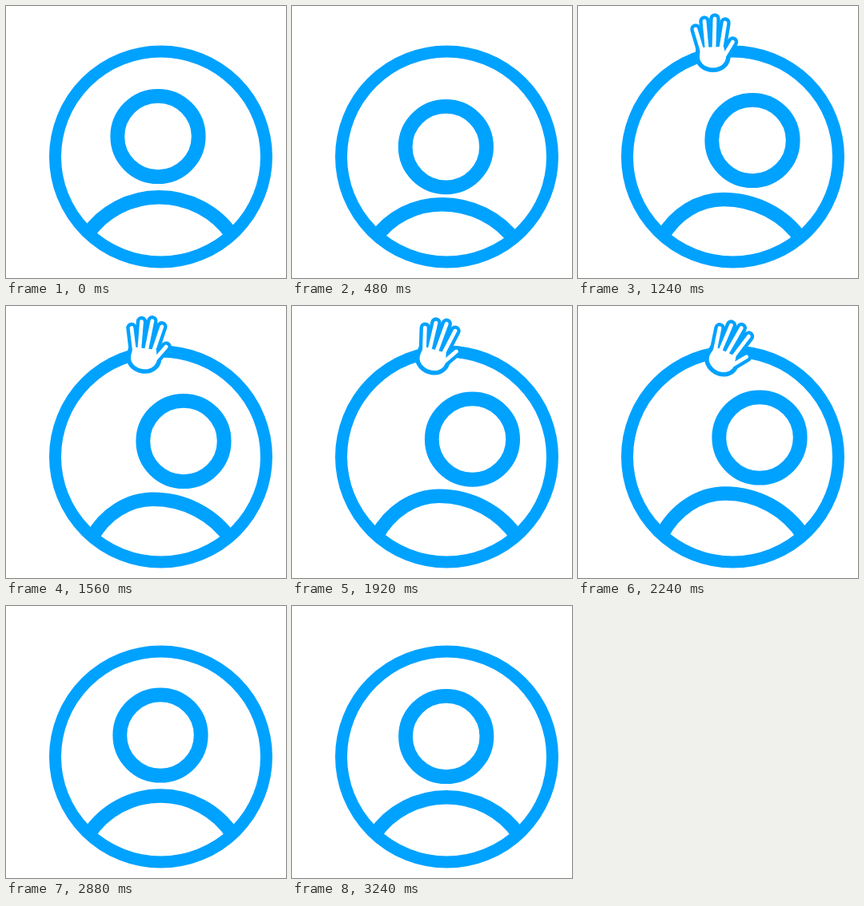
Animation of 350x341 px, one loop 4.08 s. Source, as an HTML page with a canvas:

```html
<!DOCTYPE html>
<html lang="en">
<head>
<meta charset="utf-8">
<title>Waving avatar</title>
<style>
  html, body { margin: 0; width: 100%; height: 100%; overflow: hidden; background: #fff; }
  canvas { display: block; }
</style>
</head>
<body>
<canvas id="stage" width="350" height="341"></canvas>
<script>
const ctx = document.getElementById('stage').getContext('2d');
const BLUE = '#00a2ff', WHITE = '#fff';
const LOOP = 4080, STEP = 40;
const RING = { x: 193.5, y: 189, r: 132, w: 15 };

// time, head x y, shoulder peak x y, left end x y, right end x y
const POSES = [
  [0,    190, 163.5,   191.5, 239.7, 101.5, 287, 283, 288],
  [240,  179, 168,     189, 243,     102, 289,   281, 291],
  [520,  195, 177,     187, 249,     104, 292,   279, 295],
  [800,  212.5, 173,   186, 246.5,   105, 292,   278, 295],
  [1240, 218, 168.5,   182, 242.5,   105, 290,   280, 294],
  [1560, 222, 169.5,   184, 242.3,   107, 291,   281, 293],
  [2240, 227, 165,     184, 235,     104, 288,   283, 290],
  [2600, 193.5, 181.5, 193, 261,     111, 295,   276, 295],
  [2880, 193, 162,     193, 238,     103, 287,   283.5, 287],
  [3240, 192.7, 163.5, 193, 239.7,   103, 287,   283.5, 287]
];

// time, centre x y, degrees, scale
const ENTRY = [
  [600, 68, 138, -55, 0],
  [680, 76, 122, -46, 0.85],
  [800, 114, 71.5, -18, 0.96],
  [920, 160, 64, 0, 1]
];

// finger tip and root, relative to the palm centre
const FINGERS = [
  [-22, -35, -14, -8],
  [-11, -45, -8, -12],
  [2, -48, 1, -12],
  [15, -43, 10, -12],
  [24.5, -19, 13, 0]
];

const clamp = v => Math.max(0, Math.min(1, v));
const mix = (a, b, k) => a + (b - a) * k;
const smooth = (t, a, b) => {
  const k = clamp((t - a) / (b - a));
  return k * k * (3 - 2 * k);
};

// Smooth curve through the keys without overshoot
function sample(keys, t) {
  const last = keys.length - 1;
  if (t <= keys[0][0]) return keys[0].slice(1);
  if (t >= keys[last][0]) return keys[last].slice(1);
  let i = 0;
  while (t >= keys[i + 1][0]) i++;
  const span = keys[i + 1][0] - keys[i][0];
  const u = (t - keys[i][0]) / span;
  const slope = (n, c) => (keys[n + 1][c] - keys[n][c]) / (keys[n + 1][0] - keys[n][0]);
  const tangent = (n, c) => {
    if (n === 0) return slope(0, c);
    if (n === last) return 0;
    const a = slope(n - 1, c), b = slope(n, c);
    return a * b <= 0 ? 0 : 2 * a * b / (a + b);
  };
  return keys[i].slice(1).map((v, j) => {
    const c = j + 1, d = keys[i + 1][c] - v;
    const m0 = tangent(i, c) * span, m1 = tangent(i + 1, c) * span;
    return v + u * (m0 + u * (3 * d - 2 * m0 - m1 + u * (m0 + m1 - 2 * d)));
  });
}

function circle(x, y, r, w) {
  ctx.lineWidth = w;
  ctx.beginPath();
  ctx.arc(x, y, r, 0, Math.PI * 2);
  ctx.stroke();
}

function drawShoulders(px, py, lx, ly, rx, ry) {
  const a = px - lx, b = rx - px;
  ctx.save();
  ctx.beginPath();
  ctx.arc(RING.x, RING.y, RING.r, 0, Math.PI * 2);
  ctx.clip();
  ctx.lineWidth = 17.5;
  ctx.beginPath();
  ctx.moveTo(lx, ly);
  ctx.bezierCurveTo(lx + 0.22 * a, mix(ly, py, 0.63), px - 0.4 * a, py, px, py);
  ctx.bezierCurveTo(px + 0.4 * b, py, rx - 0.22 * b, mix(ry, py, 0.63), rx, ry);
  ctx.stroke();
  ctx.restore();
}

function wave(t) {
  const k = (1 - Math.cos((t - 1240) / 400 * Math.PI * 2)) / 2;
  const lift = smooth(t, 2260, 2430);
  const leave = smooth(t, 2430, 2560);
  return [
    mix(169, 180, k),
    mix(64, 69, k) - 4 * lift + 14 * leave,
    28 * k,
    (1 + 0.04 * lift) * (1 - leave)
  ];
}

function handPose(t) {
  const enter = sample(ENTRY, t), swing = wave(t);
  const k = smooth(t, 800, 900);
  return enter.map((v, i) => mix(v, swing[i], k));
}

function palm() {
  ctx.beginPath();
  ctx.moveTo(-16, -12);
  ctx.lineTo(13, -13);
  ctx.lineTo(16, -2);
  ctx.bezierCurveTo(17, 7, 9, 13.5, 0, 13.5);
  ctx.bezierCurveTo(-10, 13.5, -18, 7, -17, -2);
  ctx.closePath();
}

function drawHand(x, y, deg, scale) {
  if (scale < 0.01) return;
  ctx.save();
  ctx.translate(x, y);
  ctx.rotate(deg * Math.PI / 180);
  ctx.scale(scale, scale);
  ctx.lineCap = ctx.lineJoin = 'round';
  for (const [color, finger, edge] of [[BLUE, 13.5, 11], [WHITE, 4.8, 0]]) {
    ctx.strokeStyle = ctx.fillStyle = color;
    palm();
    ctx.fill();
    if (edge) {
      ctx.lineWidth = edge;
      ctx.stroke();
    }
    ctx.lineWidth = finger;
    for (const [tx, ty, bx, by] of FINGERS) {
      ctx.beginPath();
      ctx.moveTo(tx, ty);
      ctx.lineTo(bx, by);
      ctx.stroke();
    }
  }
  ctx.restore();
}

function draw(t) {
  const [hx, hy, ...body] = sample(POSES, t);
  ctx.fillStyle = WHITE;
  ctx.fillRect(0, 0, 350, 341);
  ctx.strokeStyle = BLUE;
  drawShoulders(...body);
  circle(RING.x, RING.y, RING.r, RING.w);
  circle(hx, hy, 50.7, 17.8);
  if (t > 600 && t < 2560) drawHand(...handPose(t));
}

const start = performance.now();
function tick() {
  const t = (performance.now() - start) % LOOP;
  draw(Math.floor(t / STEP) * STEP);
  requestAnimationFrame(tick);
}
tick();
</script>
</body>
</html>
```
